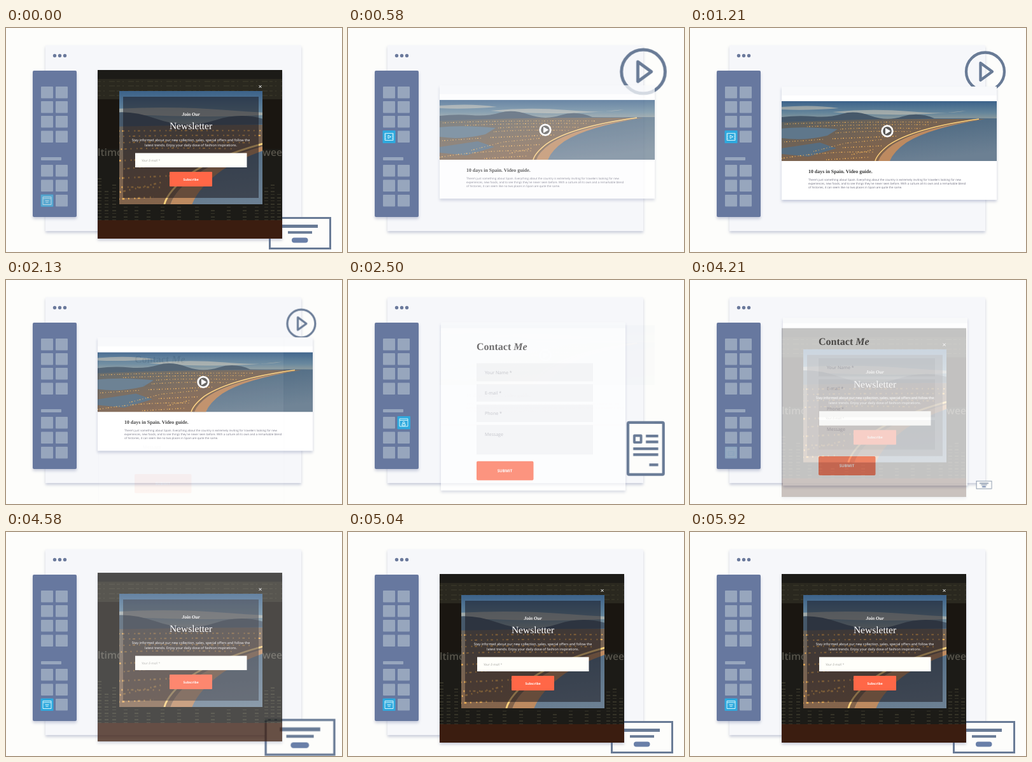
Animation of 528x352 px, one loop 5.96 s. Source, as an HTML page:

```html
<!DOCTYPE html>
<html lang="en">
<head>
<meta charset="utf-8">
<title>Page builder</title>
<style>
html, body { margin: 0; width: 100%; height: 100%; overflow: hidden; background: #fdfdfb; }
#stage { position: relative; width: 528px; height: 352px; overflow: hidden; }
svg.layer { position: absolute; inset: 0; width: 528px; height: 352px; }
text { font-family: "Open Sans", Inter, sans-serif; text-rendering: geometricPrecision; }
.serif { font-family: "Liberation Serif", "Noto Serif", serif; }
.mid { text-anchor: middle; }
.soft { filter: drop-shadow(0 3px 2px rgba(85, 100, 145, .3)); }

/* Every scene runs the same cycle, shifted by its own delay. */
.video { --delay: -5847ms; }
.contact { --delay: -3860ms; }
.news { --delay: -1870ms; }
.card, .icon, .lit { animation: 5960ms linear var(--delay) infinite; }
.card { animation-name: card; }
.icon { animation-name: icon; z-index: 0; }
.lit { animation-name: lit; }
.icon.video { transform-origin: 464px 68.5px; }
.icon.contact { transform-origin: 467.5px 264.5px; }
.icon.news { transform-origin: 462px 322px; }
.icon { fill: none; stroke: #697b96; stroke-linejoin: round; }
.glyph { fill: none; stroke: #e9ffff; stroke-width: .9; }

@keyframes card {
  0% { opacity: 0; transform: translateY(24px); z-index: 2; }
  .5% { opacity: .06; transform: translateY(19px); }
  1.95% { opacity: .25; transform: translateY(10px); }
  4.5% { opacity: .55; transform: translateY(0); }
  8.05% { opacity: .77; transform: translateY(-2px); }
  15.1% { opacity: 1; transform: translateY(0); }
  30% { z-index: 2; }
  30.1% { z-index: 1; }
  33.5% { opacity: 1; transform: translateY(0); }
  35.3% { opacity: .85; transform: translateY(-8px); }
  40.2%, 100% { opacity: 0; transform: translateY(-45px); z-index: 1; }
}
@keyframes icon {
  0%, 1.34% { transform: scale(0); }
  2% { transform: scale(.24); }
  4.7% { transform: scale(1.12); }
  5.7% { transform: scale(1.2); }
  8.05% { transform: scale(1.14); }
  13.4%, 32.9% { transform: scale(1); }
  33.85% { transform: scale(.74); }
  34.7%, 100% { transform: scale(0); }
}
@keyframes lit {
  0%, 1.8% { opacity: 0; }
  5%, 30.8% { opacity: 1; }
  32.3%, 100% { opacity: 0; }
}
</style>
</head>
<body>
<div id="stage">

<!-- Window and toolbar -->
<svg class="layer" viewBox="0 0 528 352">
  <defs>
    <linearGradient id="sky" x2="0" y2="1">
      <stop offset="0" stop-color="#3c628a"/>
      <stop offset=".55" stop-color="#66869b"/>
      <stop offset="1" stop-color="#a5a69c"/>
    </linearGradient>
    <linearGradient id="sea" x2=".3" y2="1">
      <stop offset="0" stop-color="#47657f"/>
      <stop offset="1" stop-color="#6c8093"/>
    </linearGradient>
    <linearGradient id="town" x2="1" y2="1">
      <stop offset="0" stop-color="#596061"/>
      <stop offset=".5" stop-color="#7a6350"/>
      <stop offset="1" stop-color="#936644"/>
    </linearGradient>
    <symbol id="photo" viewBox="0 0 338 94" preserveAspectRatio="xMidYMid slice">
      <rect width="338" height="34" fill="url(#sky)"/>
      <path d="M80 17Q140 11 200 16T290 15Q230 22 170 21T80 17M0 9Q50 5 90 11Q40 15 0 13" fill="#d2c8b6" opacity=".55"/>
      <path d="M0 25Q25 22 50 24T95 20T140 23T190 24T240 27L338 29V38H0Z" fill="#46586a"/>
      <path d="M150 94V30Q240 26 338 27V94Z" fill="url(#sea)"/>
      <path d="M0 33Q120 28 240 28L320 28Q215 42 174 69Q156 82 152 94H0Z" fill="url(#town)"/>
      <path d="M0 43Q35 39 88 44L72 54Q35 63 0 58Z" fill="#5f778b"/>
      <path d="M0 74L60 65L86 74L42 87L0 83Z" fill="#566d80"/>
      <path d="M320 28Q215 42 174 69Q156 82 152 94H170Q176 79 196 65Q232 42 320 28" fill="#bd8a60"/>
      <g fill="none" stroke="#e9ad58" stroke-dasharray="1 2 2 3 1 4">
        <path d="M5 36Q90 32 245 33M40 40Q130 36 235 37M92 44Q130 41 220 43M85 50Q130 46 205 48M4 64L65 60M50 79L100 66L160 60" stroke-width="1.1"/>
        <path d="M0 90Q70 78 144 80M70 92L138 88M96 73L160 70M80 59L180 55M110 84L148 75" stroke-width="1.4"/>
      </g>
      <path d="M310 28Q208 42 168 69Q150 83 147 94" fill="none" stroke="#ffd27c" stroke-width="1.5"/>
    </symbol>
  </defs>
  <rect class="soft" x="62" y="27" width="402" height="292" fill="#f6f7fa"/>
  <g fill="#6b7a9c"><circle cx="76.5" cy="43.5" r="2.7"/><circle cx="84.5" cy="43.5" r="2.7"/><circle cx="92.5" cy="43.5" r="2.7"/></g>
  <g class="soft"><rect x="42" y="67" width="69" height="230" rx="2" fill="#67789f"/></g>
  <g id="tiles" fill="#97a6bd"><rect x="55" y="203" width="32" height="5" rx="1"/></g>
  <g class="lit video">
    <rect x="54.5" y="161" width="20" height="20" rx="1" fill="#2fa9de"/>
    <path class="glyph" d="M58 165.5h13v11h-13zM58 168h2M58 171h2M58 174h2M69 168h2M69 171h2M69 174h2M63 168.5l4.5 2.5l-4.5 2.5z"/>
  </g>
  <g class="lit contact">
    <rect x="77.5" y="214" width="20.5" height="20.5" rx="1" fill="#2fa9de"/>
    <path class="glyph" d="M81 218h13v12h-13zM81 220.5h13M85 229v-3h5v3z"/>
    <circle class="glyph" cx="87.5" cy="224" r="1.5"/>
  </g>
  <g class="lit news">
    <rect x="54.5" y="261.5" width="20" height="19.5" rx="1" fill="#2fa9de"/>
    <path class="glyph" d="M58 265.5h13v12h-13zM58 268h13M61.5 271.5h6M62.5 274h4"/>
  </g>
</svg>

<!-- Floating icons -->
<svg class="layer icon video" viewBox="0 0 528 352" stroke-width="4.3">
  <circle cx="464" cy="68.5" r="30"/>
  <path d="M456.5 55L475 68.5L456.5 82Z"/>
</svg>
<svg class="layer icon contact" viewBox="0 0 528 352" stroke-width="3.6">
  <rect x="444" y="230" width="47.5" height="69.5" rx="1.5" fill="#fdfdfb"/>
  <rect x="452.5" y="247.5" width="9" height="9" stroke-width="3.3"/>
  <path d="M468 248h16.5M468 256h16.5M451 265h33.5M451 273h33.5M472.5 286.5h12"/>
</svg>
<svg class="layer icon news" viewBox="0 0 528 352" stroke-width="3">
  <rect x="414.5" y="298.5" width="95" height="48" fill="#fdfdfb" stroke-linejoin="miter"/>
  <path d="M434 311.5h56" stroke-width="5.2"/>
  <path d="M443 321.2h38" stroke-width="4"/>
  <rect x="449" y="329.5" width="25.5" height="8" rx="4" fill="#697fa8" stroke="none"/>
</svg>

<!-- Video article -->
<svg class="layer card video" viewBox="0 0 528 352">
  <rect class="soft" x="144" y="92" width="338" height="178" fill="#fff"/>
  <rect x="144" y="92" width="338" height="14" fill="#f8f9fb"/>
  <use href="#photo" x="144" y="115" width="338" height="94"/>
  <circle cx="310" cy="162" r="8.3" fill="#5c5a58" stroke="#fff" stroke-width="2.8"/>
  <path d="M307.5 157.8L314.5 162L307.5 166.2Z" fill="#fff" stroke="#fff" stroke-linejoin="round"/>
  <text class="serif" x="186" y="228" font-size="7.9" font-weight="700" fill="#333">10 days in Spain. Video guide.</text>
  <g font-size="4.5" fill="#6a6a7c">
    <text x="186" y="240">There's just something about Spain. Everything about the country is extremely inviting for travelers looking for new</text>
    <text x="186" y="246">experiences, new foods, and to see things they've never seen before. With a culture all its own and a remarkable blend</text>
    <text x="186" y="252">of histories, it can seem like no two places in Spain are quite the same.</text>
  </g>
</svg>

<!-- Contact form -->
<svg class="layer card contact" viewBox="0 0 528 352">
  <rect class="soft" x="146" y="68" width="290" height="264" fill="#fff"/>
  <rect x="146" y="68" width="290" height="9" fill="#f8f9fb"/>
  <text class="serif" x="202" y="111" font-size="16" font-weight="700" fill="#363333">Contact <tspan font-style="italic">Me</tspan></text>
  <g fill="#f4f4f5">
    <rect x="202" y="132" width="183" height="28.5"/>
    <rect x="202" y="165" width="183" height="27.5"/>
    <rect x="202" y="197" width="183" height="27.5"/>
    <rect x="202" y="229" width="183" height="46.5"/>
  </g>
  <g font-size="7.1" fill="#b0b0b8">
    <text x="215" y="149">Your Name *</text>
    <text x="215" y="181.5">E-mail *</text>
    <text x="215" y="213.5">Phone *</text>
    <text x="215" y="246">Message</text>
  </g>
  <rect x="202" y="286" width="89.5" height="30" rx="2" fill="#ff6747"/>
  <text class="mid" x="246.5" y="303.2" font-size="6.2" font-weight="700" fill="#fff">SUBMIT</text>
</svg>

<!-- Newsletter popup -->
<svg class="layer card news" viewBox="0 0 528 352">
  <g class="soft"><rect x="144" y="66" width="290" height="265" fill="#1c1b17"/></g>
  <rect x="144" y="80" width="290" height="32" fill="#2a281f"/>
  <rect x="144" y="112" width="290" height="78" fill="#1a1611"/>
  <g fill="none" stroke="#65624a" opacity=".35">
    <path d="M144 84H434M144 91H434M144 99H434M144 106H434" stroke-dasharray="5 4 2 7 9 3"/>
    <path d="M147 302V236M158 302V254M170 302V244M188 302V280M205 302V278M224 302V282M246 302V279M272 302V281M300 302V278M325 302V282M350 302V279M375 302V281M394 302V278M409 302V250M419 302V244M429 302V258" stroke-width="6" stroke-dasharray="1 3 2 4"/>
  </g>
  <rect x="144" y="302" width="290" height="29" fill="#3b1d10"/>
  <g font-size="15.8" font-weight="600" fill="#56534a">
    <text x="144" y="201">ltimo</text>
    <text x="403" y="201">wee</text>
  </g>
  <use href="#photo" x="178" y="99" width="225" height="178"/>
  <rect x="184" y="108" width="213" height="159" fill="#17141a" opacity=".52"/>
  <path d="M397.5 90l4 4m0-4l-4 4" stroke="#fff"/>
  <g class="mid" fill="#fff">
    <text class="serif" x="290.5" y="137.5" font-size="7.5" font-weight="700" font-style="italic">Join Our</text>
    <text class="serif" x="290.5" y="159" font-size="15.5">Newsletter</text>
    <g font-size="5.35" font-weight="500">
      <text x="290.5" y="177.5">Stay informed about our new collection, sales, special offers and follow the</text>
      <text x="290.5" y="185.5">latest trends. Enjoy your daily dose of fashion inspirations.</text>
    </g>
  </g>
  <rect x="203" y="196.5" width="175.5" height="22.5" fill="#fffffa"/>
  <text x="213" y="209.5" font-size="5" font-style="italic" fill="#a5a5a0">Your E-mail *</text>
  <rect x="257" y="226" width="67" height="23" rx="1" fill="#ff6747"/>
  <text class="mid" x="290.5" y="239.5" font-size="5" font-weight="700" fill="#fff">Subscribe</text>
</svg>
</div>

<script>
const tiles = document.getElementById('tiles');
for (const y of [92, 115, 138, 161.5, 215, 238.5, 262]) {
  for (const x of [55, 78]) {
    const tile = document.createElementNS('http://www.w3.org/2000/svg', 'rect');
    const box = { x, y, width: 19, height: 18.5, rx: 1 };
    for (const key in box) tile.setAttribute(key, box[key]);
    tiles.append(tile);
  }
}
</script>
</body>
</html>
```
